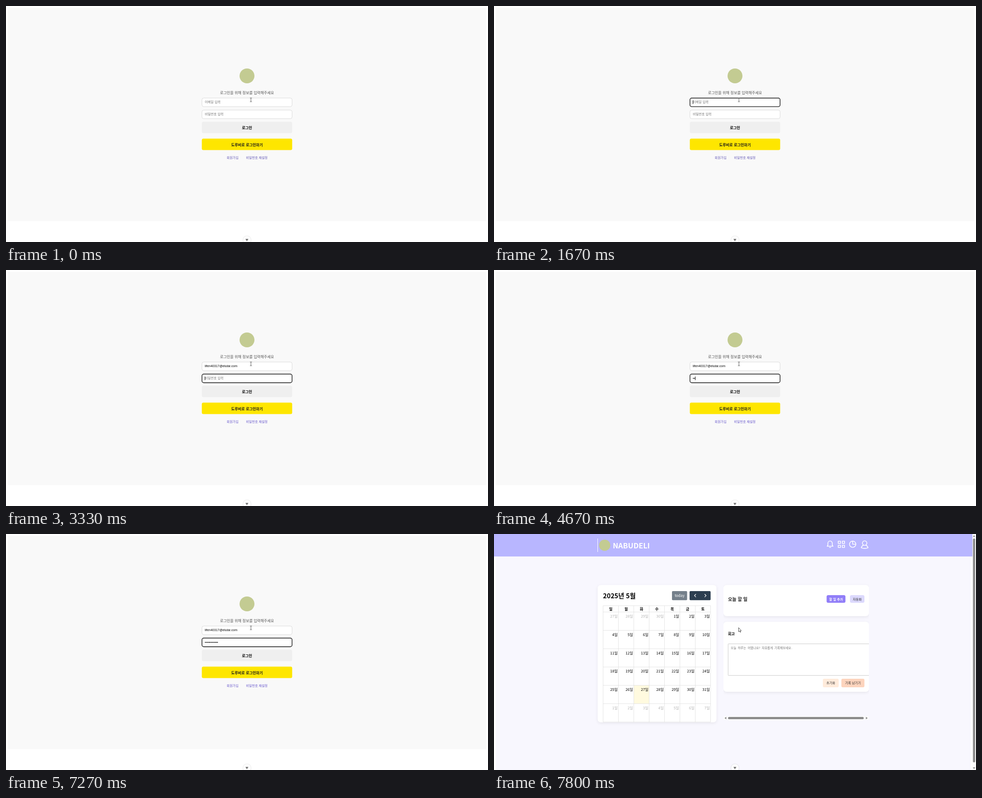
Animation of 1067 by 525 pixels, one loop 8000 ms. Source, as an HTML page:

```html
<!DOCTYPE html>
<html lang="ko">
<head>
<meta charset="utf-8">
<style>
html, body { margin: 0; width: 100%; height: 100%; overflow: hidden; background: #fff; }
svg { display: block; }
text { font: 8.16px "Noto Sans CJK KR", "Noto Sans KR", sans-serif; white-space: pre; }
.b { font-weight: 700; }
.s { font-size: 7.13px; }
.mid { text-anchor: middle; }
.end { text-anchor: end; }
.latin { font: 7.04px "Liberation Sans", Arial, sans-serif; }
.mono { font: 6.7px "Noto Sans Mono CJK KR", "Noto Sans CJK KR", monospace; }
.hint { fill: #757575; }
.field { fill: #fff; stroke: #ccc; stroke-width: .7; }
.field.focus { stroke: #101010; stroke-width: 1.4; }
.card { fill: #fff; filter: drop-shadow(0 2px 3px rgba(0, 0, 0, .07)); }
.icon { fill: none; stroke: #fff; stroke-width: 1.6; stroke-linejoin: round; stroke-linecap: round; }
.bar { fill: #8b8b8b; }
</style>
</head>
<body>
<svg width="1067" height="525" viewBox="0 0 1067 525">
  <g id="login">
    <rect x="4" y="4" width="1059" height="474.5" fill="#f9f9f9"/>
    <circle cx="533.5" cy="155.5" r="16.5" fill="#c3cb92"/>
    <text class="mid" x="533.5" y="195.6" fill="#555">로그인을 위해 정보를 입력해주세요</text>
    <rect id="mailBox" class="field" x="433.8" y="204.7" width="199.5" height="19.2" rx="4"/>
    <rect id="passBox" class="field" x="433.8" y="231.5" width="199.5" height="19.2" rx="4"/>
    <text id="mailHint" class="s hint" x="440" y="216.2">이메일 입력</text>
    <text id="passHint" class="s hint" x="440" y="243.4">비밀번호 입력</text>
    <text id="mail" class="latin" x="440" y="216.1">lifen40317@elutar.com</text>
    <text id="dots" class="latin" x="440" y="243.3"></text>
    <rect id="caret" width="1" height="8"/>
    <rect x="433.5" y="257.5" width="200" height="25.3" rx="3.5" fill="#efefef"/>
    <text class="b mid" x="533.5" y="274.1">로그인</text>
    <rect x="433.5" y="295" width="200" height="25.5" rx="3.5" fill="#fee600"/>
    <text class="b mid" x="533.5" y="311.8" fill="#191919">도루비로 로그인하기</text>
    <g id="links">
      <text class="s" x="488.5" y="340.2">회원가입</text>
      <text class="s" x="531.3" y="340.2">비밀번호 재설정</text>
    </g>
    <path d="M540 204.5h1.5l.7.5.7-.5h1.5M542.2 205v7.5M540 213h1.5l.7-.5.7.5h1.5" fill="none" stroke="#444" stroke-width=".9"/>
  </g>

  <g id="home">
    <rect x="4" y="50" width="1051" height="475" fill="#f8f7fe"/>
    <rect width="1059" height="50" fill="#b8b6ff"/>
    <rect id="mark" x="229" y="10" width="1" height="30" fill="#fff"/>
    <circle cx="245" cy="25" r="12.5" fill="#c3cb92"/>
    <text class="b" x="263" y="32" fill="#fff" style="font-size:16.2px">NABUDELI</text>
    <g class="icon">
      <path d="M737.5 27.3h13l-1.7-2.6v-4.2a4.8 5 0 0 0-9.6 0v4.2zM742.5 29.8h3"/>
      <path d="M762 16h5v5h-5zM771 16h5v5h-5zM762 25h5v5h-5zM771 25h5v5h-5z"/>
      <circle cx="794" cy="22.7" r="7"/>
      <path d="M794 16v6.7h6.7"/>
      <circle cx="820.5" cy="20.3" r="5"/>
      <path d="M813 30.5q.7-3.6 4.2-5.3M828 30.5q-.7-3.6-4.2-5.3M813 30.5q7.5 3.2 15 0"/>
    </g>
    <rect x="1059" width="8" height="525" fill="#fcfcfc"/>
    <rect class="bar" x="1060.2" y="10" width="5" height="498" rx="2.5"/>
    <path class="bar" d="M1060 6.5h5.4l-2.7-4zM1060 519h5.4l-2.7 4z"/>

    <rect class="card" x="229.5" y="113.5" width="263" height="305.5" rx="7"/>
    <g id="calendar">
      <text class="b" x="241.3" y="142.8" style="font-size:14.28px">2025년 5월</text>
      <rect x="394" y="127" width="33.5" height="20.2" rx="2" fill="#75808b"/>
      <text class="mid" x="410.8" y="140.3" fill="#fff">today</text>
      <rect x="433" y="127" width="46.5" height="20.2" rx="2" fill="#2c3e50"/>
      <path d="M447 133.8l-3.2 3.3 3.2 3.3M466.3 133.8l3.2 3.3-3.2 3.3" fill="none" stroke="#fff" stroke-width="1.3"/>
    </g>

    <svg x="508" y="100" width="322" height="320" viewBox="508 100 322 320">
      <rect class="card" x="508" y="113.5" width="322" height="69.3" rx="7"/>
      <text class="b" x="518" y="148.8" fill="#222" style="font-size:10.2px">오늘 할 일</text>
      <rect x="736.3" y="136" width="41.7" height="17" rx="3.5" fill="#917ef8"/>
      <text class="s b mid" x="757.2" y="147.5" fill="#fff">할 일 추가</text>
      <rect x="788" y="136" width="32" height="17" rx="3.5" fill="#dcd9fd"/>
      <text class="s mid" x="804" y="147.5" fill="#333">자동화</text>
      <rect class="card" x="508" y="195.2" width="322" height="155.8" rx="7"/>
      <text class="b" x="518" y="225">회고</text>
      <rect x="518.3" y="244.3" width="330" height="70.4" rx="1" fill="#fff" stroke="#bbb" stroke-width=".8"/>
      <text class="mono hint" x="524" y="255.6">오늘 하루는 어땠나요? 자유롭게 기록해보세요.</text>
      <rect x="728" y="322" width="35" height="19" rx="3" fill="#ffebdb"/>
      <text class="s mid" x="745.6" y="334.3" fill="#333">초기화</text>
      <rect x="769" y="322" width="51" height="19" rx="3" fill="#fdd4bd"/>
      <text class="s mid" x="794.6" y="334.3" fill="#333">기록 남기기</text>
      <rect x="508" y="405.5" width="322" height="8" fill="#fcfcfc"/>
      <rect class="bar" x="518" y="407" width="300.5" height="5" rx="2.5"/>
      <path class="bar" d="M514.3 406.8v5.4l-4-2.7zM823.2 406.8v5.4l4-2.7z"/>
    </svg>
    <path d="M541.5 208.3v9.2l2.1-1.9 1.4 3.1 1.3-.6-1.4-3h2.6z" fill="#fff" stroke="#222" stroke-width=".8"/>
  </g>

  <circle cx="533.5" cy="520.5" r="8.5" fill="#fff" style="filter:drop-shadow(0 0 1px rgba(0,0,0,.2))"/>
  <path d="M530 518h6.6l-3.3 5.6z" fill="#777"/>
</svg>
<script>
const $ = id => document.getElementById(id);
const show = (id, on) => $(id).style.display = on ? '' : 'none';

function buildCalendar() {
  const left = 241.5, colW = 34, top = 173.6, rowH = 40.77, bottom = top + 6 * rowH;
  let cells = `<rect x="${left + 2 * colW}" y="${top + 4 * rowH}" width="${colW}" height="${rowH}" fill="#fffadf"/>`;
  let grid = `M${left} 159.5h${7 * colW}`;
  for (let c = 0; c <= 7; c++) grid += `M${left + c * colW} 159.5V${bottom}`;
  for (let r = 0; r <= 6; r++) grid += `M${left} ${top + r * rowH}h${7 * colW}`;
  cells += `<path d="${grid}" stroke="#ddd" stroke-width=".8"/>`;
  [...'일월화수목금토'].forEach((name, c) =>
    cells += `<text class="b mid" x="${left + (c + .5) * colW}" y="169.9">${name}</text>`);
  for (let i = 0; i < 42; i++) {
    const day = new Date(2025, 3, 27 + i);
    const x = left + (i % 7 + 1) * colW - 1.8, y = top + Math.floor(i / 7) * rowH + 12.4;
    cells += `<text class="end" x="${x}" y="${y}" fill="${day.getMonth() === 4 ? '#000' : '#b3b3b3'}">${day.getDate()}일</text>`;
  }
  $('calendar').insertAdjacentHTML('beforeend', cells);
}

const keyTimes = [4530, 4670, 5000, 5130, 5200, 5330, 5730, 5800, 5930, 6130, 6400, 6730];
const caretTimes = [[670, 1130], [1670, 2200], [2470, 3000], [3330, 3870], [4400, 7270]];

function draw() {
  const t = performance.now() % 8000;
  const filled = t >= 2470, onPass = t >= 3330;
  const typed = keyTimes.filter(k => t >= k).length;

  show('login', t < 7470);
  show('home', t >= 7470);
  show('calendar', t >= 7600);
  show('mark', t >= 7800);

  $('mailBox').classList.toggle('focus', t >= 670 && !onPass);
  $('passBox').classList.toggle('focus', onPass);
  show('mailHint', !filled);
  show('mail', filled);
  show('passHint', !typed);
  $('dots').textContent = '•'.repeat(typed);
  $('links').setAttribute('fill', onPass ? '#6a5acd' : '#665bb8');

  show('caret', caretTimes.some(([on, off]) => t >= on && t < off));
  $('caret').setAttribute('x', onPass ? 440 + typed * 2.46 : filled ? 512 : 440);
  $('caret').setAttribute('y', onPass ? 237 : 210);
  requestAnimationFrame(draw);
}

buildCalendar();
draw();
</script>
</body>
</html>
```
